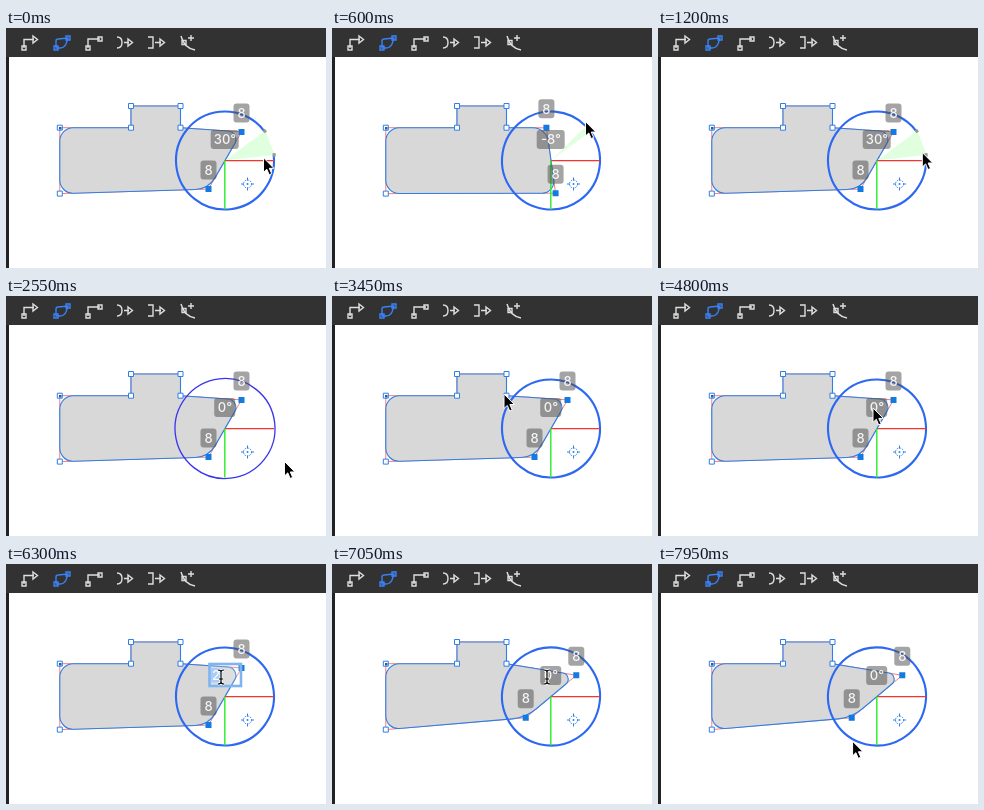
Animation, 320 px wide and 240 px high, one loop 8000 ms. Source, as an HTML page:

```html
<!DOCTYPE html>
<html lang="en">
<head>
<meta charset="utf-8">
<title>Rotating an edge</title>
<style>
html, body { margin: 0; width: 100%; height: 100%; overflow: hidden; background: #fff; }
svg { display: block; width: 100vw; height: 100vh; }
text { font: 500 13px Inter, "Liberation Sans", sans-serif; fill: #fff; fill-opacity: .9; }
.tag { fill: #505050; fill-opacity: .52; }
.icon { fill: none; stroke: #dedede; stroke-width: 1.4; }
.icon .dot { fill: #dedede; stroke: none; }
.icon.blue { stroke: #3b82f6; }
.icon.blue .dot { fill: #3b82f6; }
</style>
</head>
<body>
<svg viewBox="0 0 320 240">
  <defs>
    <g id="size"><rect class="tag" x="-8" y="-9.500" width="16" height="19" rx="3"/><text y="4.700" text-anchor="middle">8</text></g>
    <path id="caret" d="M-3 -7Q0 -7 0 -5Q0 -7 3 -7M0 -5V5M-3 7Q0 7 0 5Q0 7 3 7M-2 2H2"/>
    <path id="head" class="dot" d="M0 -3.500L4.500 0L0 3.500z"/>
    <path id="knob" class="dot" d="M-2 -2h4v4h-4z"/>
  </defs>
  <rect width="3" height="240" fill="#222"/>
  <rect width="320" height="29" fill="#323232"/>
  <g class="icon">
    <path d="M18 20V11.500H28"/><use href="#knob" x="18" y="20"/><use href="#head" x="27" y="11.500"/>
  </g>
  <g class="icon blue">
    <path d="M50 20V13Q50 11 52 11L62 10L60 16Q58 20 54 20Z"/><use href="#knob" x="50" y="20"/><use href="#knob" x="62" y="10"/>
  </g>
  <g class="icon">
    <path d="M82 20V11H94"/><use href="#knob" x="82" y="20"/><use href="#knob" x="94" y="11"/>
  </g>
  <g class="icon">
    <path d="M111 9Q116 9 116 14.500Q116 20 111 20M118 14.500H123"/><use href="#head" x="122" y="14.500"/>
  </g>
  <g class="icon">
    <path d="M142 9H147V20H142M149 14.500H155"/><use href="#head" x="154" y="14.500"/>
  </g>
  <g class="icon">
    <path d="M175 8Q178 20 189 22M185 7V13M182 10H188"/><use href="#knob" x="178" y="14.500"/>
  </g>

  <path id="bounds" fill="none" stroke="#ff5a50" stroke-width=".8"/>
  <path id="shape" fill="#d8d8d8" stroke="#2f7fe6" stroke-width="1.100"/>
  <path id="pie" fill="#dfffdf"/>
  <circle id="ring" cx="219" cy="132.500" fill="none" pathLength="360"/>
  <path id="ticks" fill="none" stroke="#999" stroke-width="3"/>
  <path d="M219 132.700H268" stroke="#f4352d" stroke-width="1.200"/>
  <path d="M218.800 132.500V181.500" stroke="#27ee27" stroke-width="1.400"/>
  <g fill="none" stroke="#2f7fe6">
    <circle cx="241.500" cy="156" r="4" stroke-dasharray="1.500 1.100"/>
    <path d="M241.500 149.500v3M241.500 159.500v3M235 156h3M245 156h3"/>
    <circle cx="241.500" cy="156" r="1" fill="#2f7fe6" stroke="none"/>
  </g>
  <path id="nodes" fill="#fff" stroke="#2f7fe6"/>
  <rect x="53" y="99" width="2.500" height="2.500" fill="#1b5fb8"/>
  <path id="picked" fill="#127ae2"/>

  <use id="sizeA" href="#size"/>
  <use id="sizeB" href="#size"/>
  <g id="angle"><rect id="angleBox" class="tag" y="102" height="19" rx="3"/><text id="angleText" x="219" y="116.300" text-anchor="middle"></text></g>
  <g id="field">
    <rect x="203.500" y="100" width="31.500" height="22" fill="#fff" fill-opacity=".15" stroke="#7db4f2" stroke-width="2.600"/>
    <rect x="205" y="104" width="12" height="14.500" fill="#a9cdf8"/>
    <text id="typed" x="206" y="116.300"></text>
  </g>

  <path id="arrow" d="M0 0V14.500L3.300 11.400L5.700 17L8.200 15.900L5.800 10.500H10.400Z" fill="#000" stroke="#fff" stroke-width="1"/>
  <g id="beam" fill="none" transform="translate(215 113)">
    <use href="#caret" stroke="#fff" stroke-width="3"/>
    <use href="#caret" stroke="#000" stroke-width="1.200"/>
  </g>
</svg>
<script>
const LOOP = 8000, STEP = 150, CX = 219, CY = 132.5, CUT = 13.5;
const $ = id => document.getElementById(id);
const set = (id, attrs) => { for (const k in attrs) $(id).setAttribute(k, attrs[k]); };
const show = (id, on) => set(id, { display: on ? 'inline' : 'none' });
const move = (id, x, y) => set(id, { transform: `translate(${x} ${y})` });
const square = ([x, y], s) => `M${x - s / 2} ${y - s / 2}h${s}v${s}h${-s}z`;
const polar = (deg, r) => {
  const a = deg * Math.PI / 180;
  return [CX + r * Math.cos(a), CY + r * Math.sin(a)];
};

// Pointer stops as time, angle and distance around the ring centre.
const stops = [[0, -4, 38.6], [600, -48.5, 52], [1200, -10, 46], [1800, -10, 46],
  [2550, 29, 68], [3000, 29, 68], [3750, 318, 53], [3900, 318, 53], [4050, 240, 55],
  [4350, 133, 51], [4800, 79, -21], [7650, 79, -21], [7950, 118.6, 51]];

function pointer(t) {
  const i = stops.findLastIndex(s => s[0] <= t);
  const a = stops[i], b = stops[i + 1] || a;
  const k = (t - a[0]) / (b[0] - a[0] || 1), e = k * k * (3 - 2 * k);
  return polar(a[1] + (b[1] - a[1]) * e, a[2] + (b[2] - a[2]) * e);
}

// The edge swings from 30 to -8 degrees and back, later 20 more are typed in.
const tilt = t => t < 1200 ? 11 + 19 * Math.cos(2 * Math.PI * t / 1200) : t < 7050 ? 30 : 50;

// Each rounded corner is cut a fixed length from its tip.
function outline(pts) {
  const toward = (p, q) => {
    const d = Math.hypot(q[0] - p[0], q[1] - p[1]);
    return [(q[0] - p[0]) / d, (q[1] - p[1]) / d];
  };
  return pts.map((p, i) => {
    const cmd = i ? 'L' : 'M';
    if (!p[2]) return `${cmd}${p[0]} ${p[1]}`;
    const u = toward(p, pts.at(i - 1)), v = toward(p, pts[(i + 1) % pts.length]);
    const half = Math.acos(u[0] * v[0] + u[1] * v[1]) / 2, r = CUT * Math.tan(half);
    return `${cmd}${p[0] + u[0] * CUT} ${p[1] + u[1] * CUT}` +
      `A${r} ${r} 0 0 1 ${p[0] + v[0] * CUT} ${p[1] + v[1] * CUT}`;
  }).join('') + 'Z';
}

function drawShape(deg) {
  const top = polar(deg - 90, 33), low = polar(deg + 90, 33);
  const pts = [[53.8, 99.7, 1], [125, 99.7], [125, 78], [174.5, 78], [174.5, 99.7],
    [...top, 1], [...low, 1], [53.8, 165.6, 1]];
  const fixed = pts.filter((p, i) => i < 5 || i > 6);
  set('shape', { d: outline(pts) });
  set('bounds', { d: 'M' + pts.map(p => p[0] + ' ' + p[1]).join('L') + 'Z' });
  set('nodes', { d: fixed.map(p => square(p, 5)).join('') });
  set('picked', { d: square(top, 6) + square(low, 6) });
  move('sizeA', top[0], top[1] - 19);
  move('sizeB', low[0], low[1] - 19);
}

function drawRing(deg, drag, near) {
  const from = -36.5, to = from + deg, gap = drag ? Math.abs(deg) : 0;
  set('ring', {
    r: near ? 49 : 50,
    stroke: near ? '#2c68f2' : '#3935ec',
    'stroke-width': near ? 2.1 : 1.3,
    'stroke-dasharray': gap ? `${360 - gap} ${gap}` : 'none',
    transform: `rotate(${Math.max(from, to)} ${CX} ${CY})`
  });
  show('pie', drag);
  show('ticks', drag && deg > 0);
  const tick = d => `M${polar(d - 2, 49.5)}L${polar(d + 2, 49.5)}`;
  set('pie', { d: `M${CX} ${CY}L${polar(from, 50)}L${polar(to, 50)}Z` });
  set('ticks', { d: tick(from) + tick(to) });
}

function draw(time) {
  const t = Math.floor(time / STEP) * STEP;
  const deg = tilt(t), [mx, my] = pointer(t);
  const drag = t < 1950, edit = t >= 5250 && t < 7050, beam = t >= 5250 && t < 7200;

  drawShape(deg);
  drawRing(deg, drag, Math.hypot(mx - CX, my - CY) < 60);

  show('angle', !edit);
  show('field', edit);
  const wide = drag ? 28 : 21;
  set('angleBox', { x: 218.7 - wide / 2, width: wide });
  $('angleText').textContent = (drag ? Math.round(deg) : 0) + '°';
  $('typed').textContent = t < 6300 ? '0°' : t < 6450 ? '2' : '20';

  show('arrow', !beam);
  show('beam', beam);
  move('arrow', mx, my);
}

function tick() {
  draw(performance.now() % LOOP);
  requestAnimationFrame(tick);
}
tick();
</script>
</body>
</html>
```
